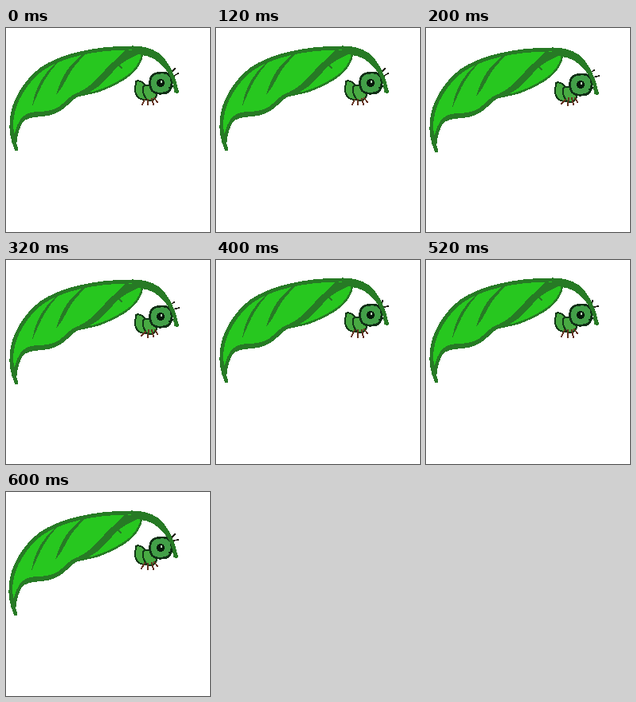
Write an HTML page that moves like this. It is 256 px wide and 256 px high and loops after 0.8 s.

```html
<!DOCTYPE html>
<html lang="en">
<head>
<meta charset="utf-8">
<title>Ant under a leaf</title>
<style>
  html, body { margin: 0; width: 100%; height: 100%; overflow: hidden; background: #fff; }
  svg { display: block; width: 100%; height: 100%; }
  path { stroke-linecap: round; stroke-linejoin: round; }
  .blade { fill: #27c71f; }
  .dark { fill: #277a25; }
  .line { fill: none; stroke: #277a25; }
  .body { fill: #48aa42; stroke: #123817; stroke-width: 2; }
  .head { fill: #429f48; stroke: #103016; stroke-width: 2.8; }
  #legs { fill: none; stroke: #653321; stroke-width: 2; }
  #feelers { fill: none; stroke: #252219; stroke-width: 1.7; }
</style>
</head>
<body>
<svg viewBox="0 0 256 256" shape-rendering="crispEdges">
  <g id="leaf">
    <path class="blade" d="M13 152 C8 140 6 130 7 116 C9 92 24 68 44 52 C70 34 112 25 158 25 L171 32 C169 45 161 56 146 65 C132 73 118 80 104 82 C92 84 86 86 79 93 C70 103 62 107 46 108 C34 108 27 110 20 118 C14 128 13 142 13 152 Z"/>
    <!-- veins taper towards their lower ends -->
    <path class="dark" d="M98 31 L104 29 C88 44 82 52 76 64 C72 72 68 78 63 84 C67 69 74 55 82 46 Z"/>
    <path class="dark" d="M60 46 L65 43 C52 58 45 70 41 80 L33 98 C35 82 42 67 51 56 Z"/>
    <path class="dark" d="M150 27 L173 30 C161 35 149 41 143 46 C133 55 125 66 115 74 C107 80 99 84 90 86 L82 85 C96 79 105 73 112 66 C121 57 130 45 139 39 Z"/>
    <path class="line" stroke-width="2" d="M139 44 L145 50"/>
    <path class="line" stroke-width="2.6" d="M171 33 C169 45 161 56 146 65 C132 73 118 80 104 82 L90 85"/>
    <path class="dark" d="M13 154 C13 140 15 129 20 120 C25 112 34 112 46 111 C60 110 70 104 77 97 C84 90 88 86 98 84 L86 83 C76 88 70 99 60 102 C50 106 40 104 31 106 C21 108 14 118 11 132 L8 134 Z"/>
    <path class="line" stroke-width="4.8" d="M13 152 C8 140 6 130 7 116 C9 92 24 68 44 52 C70 34 112 25 158 25"/>
  </g>
  <g id="ant">
    <path class="body" d="M163 67 C168 65 174 68 175 75 C177 81 178 87 175 90 C168 90 163 86 162 78 Z"/>
    <path class="body" d="M172 74 C178 68 187 76 189 83 C189 89 184 91 178 91 C174 87 171 81 172 74 Z"/>
    <path class="head" d="M182 62 C184 57 189 56 196 56 C203 56 208 60 208 68 C208 77 204 82 196 82 C188 83 182 80 181 73 C180 69 181 65 182 62 Z"/>
    <circle cx="194" cy="69" r="5" fill="#07190b"/>
    <circle cx="195" cy="67.5" r="1.2" fill="#b9d9bb"/>
    <path class="line" stroke-width="1.6" style="stroke:#0b2610" d="M205 75 L209 73"/>
  </g>
  <path id="legs"/>
  <path id="feelers"/>
  <path id="stem" class="dark" d="M150 23 C168 21 182 25 191 31 C205 42 212 58 217 80 L215 82 L211 81 C211 68 206 59 199 50 C191 41 182 35 170 34 Z"/>
</svg>
<script>
const HOLD = 200;
const part = id => document.getElementById(id);

// Hand-drawn wobble: leaf and ant offsets, plus redrawn limbs.
const poses = [
  {
    leaf: [0, 0], ant: [0, 0],
    legs: "M174 90 L171 96 M178 90 L178 96 M183 89 L185 96 M186 88 L190 93",
    feelers: "M206 57 L212 51 M211 60 L216 57"
  },
  {
    leaf: [0, 2], ant: [0, 2],
    legs: "M175 90 L170 95 M179 88 L178 97 M183 88 L185 96 M187 88 L190 93",
    feelers: "M206 56 L211 53 M210 62 L217 60"
  },
  {
    leaf: [0, 0], ant: [0, 0],
    legs: "M174 88 L170 96 M178 88 L178 97 M183 88 L185 97 M186 87 L190 92",
    feelers: "M208 57 L209 51 M211 59 L216 58"
  },
  {
    leaf: [-1, 1], ant: [0, 1],
    legs: "M174 89 L170 96 M178 90 L178 97 M183 89 L185 97 M186 88 L190 93",
    feelers: "M207 58 L212 53 M210 61 L216 60"
  }
];

const move = (id, offset) => part(id).setAttribute("transform", `translate(${offset})`);
const draw = (id, path) => part(id).setAttribute("d", path);

function show(pose) {
  move("leaf", pose.leaf);
  move("stem", pose.leaf);
  move("ant", pose.ant);
  draw("legs", pose.legs);
  draw("feelers", pose.feelers);
}

let start = null, current = -1;
function tick(now) {
  start ??= now;
  const step = Math.floor((now - start) / HOLD) % poses.length;
  if (step !== current) show(poses[current = step]);
  requestAnimationFrame(tick);
}
show(poses[0]);
requestAnimationFrame(tick);
</script>
</body>
</html>
```
